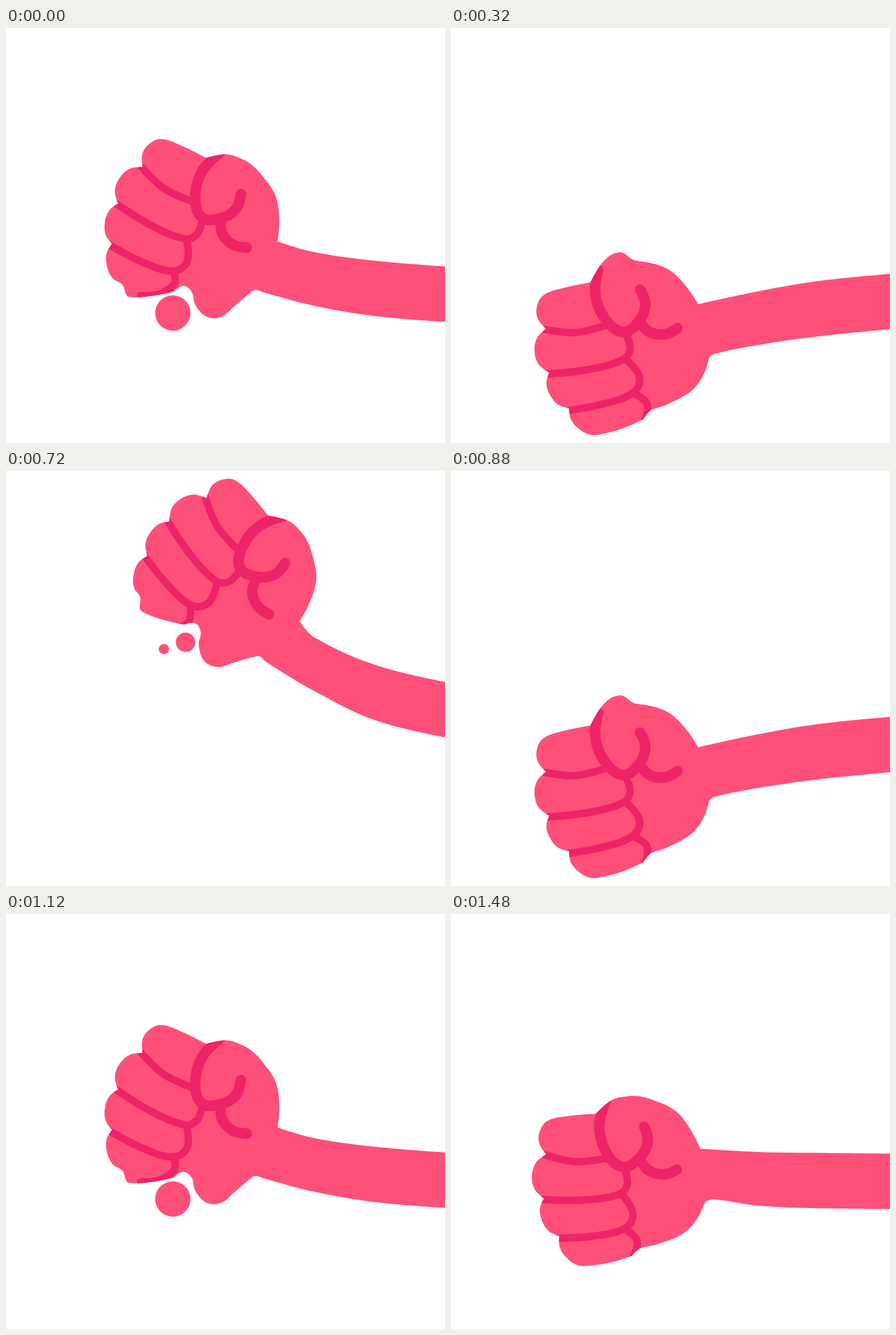
An HTML page for the animation above (2.32 s loop, 770x727 px).

```html
<!DOCTYPE html>
<html lang="en">
<head>
<meta charset="utf-8">
<title>Shaking fist</title>
<style>
  html, body { margin: 0; width: 100%; height: 100%; overflow: hidden; background: #fff; }
  svg { display: block; width: 100vw; height: 100vh; }
  .skin { fill: #ff5079; }
  .lines { fill: none; stroke: #ef2367; stroke-width: 13; stroke-linecap: round; stroke-linejoin: round; }
  .lines .wide { stroke-width: 18.5; }
</style>
</head>
<body>
<svg viewBox="0 0 770 727">
  <clipPath id="inside"><path id="clip"/></clipPath>
  <path id="body" class="skin"/>
  <g clip-path="url(#inside)">
    <g id="lines" class="lines">
      <path id="thumb" class="wide"/>
      <path id="palm" class="wide"/>
      <path id="index"/>
      <path id="middle"/>
      <path id="ring"/>
      <path id="little"/>
    </g>
  </g>
  <g id="drops" class="skin">
    <circle id="blob"/>
    <circle id="dot" cx="-101.5" cy="178"/>
  </g>
</svg>
<script>
const $ = id => document.getElementById(id);
const set = (id, attrs) => {
  for (const k in attrs) $(id).setAttribute(k, attrs[k]);
};
const mix = (a, b, w) => Array.isArray(a) ? a.map((v, i) => mix(v, b[i], w)) : a + (b - a) * w;

// One rigid hand, placed by wrist position and turn (degrees).
// arm: middle heights at ARM_X; loose: heel bulges away from the little finger;
// lift: thumb pushed up; curl: little finger crease runs along the edge.
const ARM_X = [540, 650, 790], ARM_HALF = [47, 48.5, 48.5];
const rest = { x: 442, y: 456, turn: 0, arm: [464, 467, 468.5], loose: 0, lift: 0, curl: 0, blob: [-94, 148, 0], dot: 0 };
const low = { ...rest, x: 444, y: 528, turn: -7, arm: [508, 491, 477.5], lift: 15 };
const raised = { ...rest, x: 457.5, y: 415.2, turn: 31, arm: [439.5, 456.5, 467.5], loose: 1, curl: 1, blob: [-98, 157, 31] };
const high = { ...rest, x: 481, y: 293, turn: 55, arm: [338, 389, 422], loose: 1, blob: [-89.5, 140, 17], dot: 9 };

const blend = (a, b, w) => Object.fromEntries(Object.keys(a).map(k => [k, mix(a[k], b[k], w)]));

// One shake, held in steps.
const STEP = 80, LOOP = 2320, LAST_SHAKE = 1120;
const shake = [
  raised, blend(raised, high, .6), high, blend(high, rest, .6),
  low, blend(rest, low, 1.13), blend(rest, raised, .15)
];
const settle = blend(rest, low, .24);

function poseAt(t) {
  if (t >= 1480) return rest;
  if (t >= LAST_SHAKE + 4 * STEP) return settle;
  return shake[Math.floor(t / STEP) % shake.length];
}

// Round fingertip standing out from the line a-b.
function fingertip(a, b, depth) {
  const dx = b[0] - a[0], dy = b[1] - a[1], n = depth / Math.hypot(dx, dy);
  return [[.2, .75], [.5, 1], [.8, .75]].map(([t, h]) =>
    [a[0] + dx * t - dy * n * h, a[1] + dy * t + dx * n * h]);
}

// A third value of 1 marks a sharp corner.
const NOTCHES = [[-275, -35, 1], [-279, 42, 1], [-252, 108, 1]];
const FINGERS = [
  ...fingertip([-250, -100], NOTCHES[0], 25), NOTCHES[0],
  ...fingertip(NOTCHES[0], NOTCHES[1], 23), NOTCHES[1],
  ...fingertip(NOTCHES[1], NOTCHES[2], 18), NOTCHES[2],
  ...fingertip(NOTCHES[2], [-200, 160], 18), [-200, 160]
];
const FIRM_HEEL = [[-160, 154], [-125, 143, 1], [-111, 130], [-95, 126], [-78, 122], [-42, 108], [-22, 93], [-8, 74]];
const LOOSE_HEEL = [[-178, 172], [-116, 124, 1], [-107, 107], [-89, 108], [-72, 124], [-44, 132], [-22, 119], [-12, 92]];

const FLAT_TAIL = [[-124, 148], [-116, 129], [-117, 113], [-137, 96]];
const CURLED_TAIL = [[-162, 160], [-136, 141], [-122, 112], [-132, 96]];

const handOutline = p => [
  [-5, -45, 1], [-18, -72], [-38, -101], [-57, -117], [-85, -129], [-108, -136],
  [-130, -137 - p.lift], [-160, -130 - p.lift * .7], [-188, -106, 1], [-237, -102],
  ...FINGERS,
  ...mix(FIRM_HEEL, LOOSE_HEEL, p.loose),
  [-1, 60], [5, 48], [20, 44]
];

// Smooth path through points; ends and corners get no tangent.
function curve(list) {
  const last = list.length - 1;
  const dir = list.map((p, i) => {
    if (p[2] || i === 0 || i === last) return [0, 0];
    const dx = list[i + 1][0] - list[i - 1][0], dy = list[i + 1][1] - list[i - 1][1];
    const d = Math.hypot(dx, dy) || 1;
    return [dx / d, dy / d];
  });
  const put = (x, y) => x.toFixed(1) + ',' + y.toFixed(1) + ' ';
  let d = 'M' + put(...list[0]);
  for (let i = 0; i < last; i++) {
    const [x0, y0] = list[i], [x1, y1] = list[i + 1];
    const k = Math.hypot(x1 - x0, y1 - y0) * .36;
    d += 'C' + put(x0 + dir[i][0] * k, y0 + dir[i][1] * k) +
      put(x1 - dir[i + 1][0] * k, y1 - dir[i + 1][1] * k) + put(x1, y1);
  }
  return d;
}

const CREASES = {
  thumb: [[-172, -126], [-182, -84], [-171, -41], [-142, -13], [-112, -28], [-97, -56], [-103, -83]],
  palm: [[-109, -24], [-94, -6], [-68, 0], [-46, -8]],
  index: [[-277, -34], [-225, -22], [-170, -28]],
  middle: [[-282, 44], [-210, 45], [-147, 35], [-133, 18], [-136, -4]],
  ring: [[-256, 112], [-190, 108], [-136, 94], [-123, 68], [-142, 36]]
};
for (const name in CREASES) set(name, { d: curve(CREASES[name]) });

function draw(p) {
  const a = p.turn * Math.PI / 180, c = Math.cos(a), s = Math.sin(a);
  const hand = handOutline(p).map(([x, y, corner]) =>
    [p.x + x * c - y * s, p.y + x * s + y * c, corner]);
  const edge = side => ARM_X.map((x, i) => [x, p.arm[i] + side * ARM_HALF[i]]);
  const d = curve([...edge(-1).reverse(), ...hand, ...edge(1)]) + 'Z';
  set('body', { d });
  set('clip', { d });

  const transform = `translate(${p.x} ${p.y}) rotate(${p.turn})`;
  set('lines', { transform });
  set('little', { d: curve(mix(FLAT_TAIL, CURLED_TAIL, p.curl)) });

  const [cx, cy, r] = p.blob;
  set('drops', { transform, visibility: p.loose > .5 ? 'visible' : 'hidden' });
  set('blob', { cx, cy, r });
  set('dot', { r: p.dot });
}

const start = performance.now();
let shown;
function tick(now) {
  const pose = poseAt(Math.max(0, now - start) % LOOP);
  if (pose !== shown) draw(shown = pose);
  requestAnimationFrame(tick);
}
tick(start);
</script>
</body>
</html>
```
